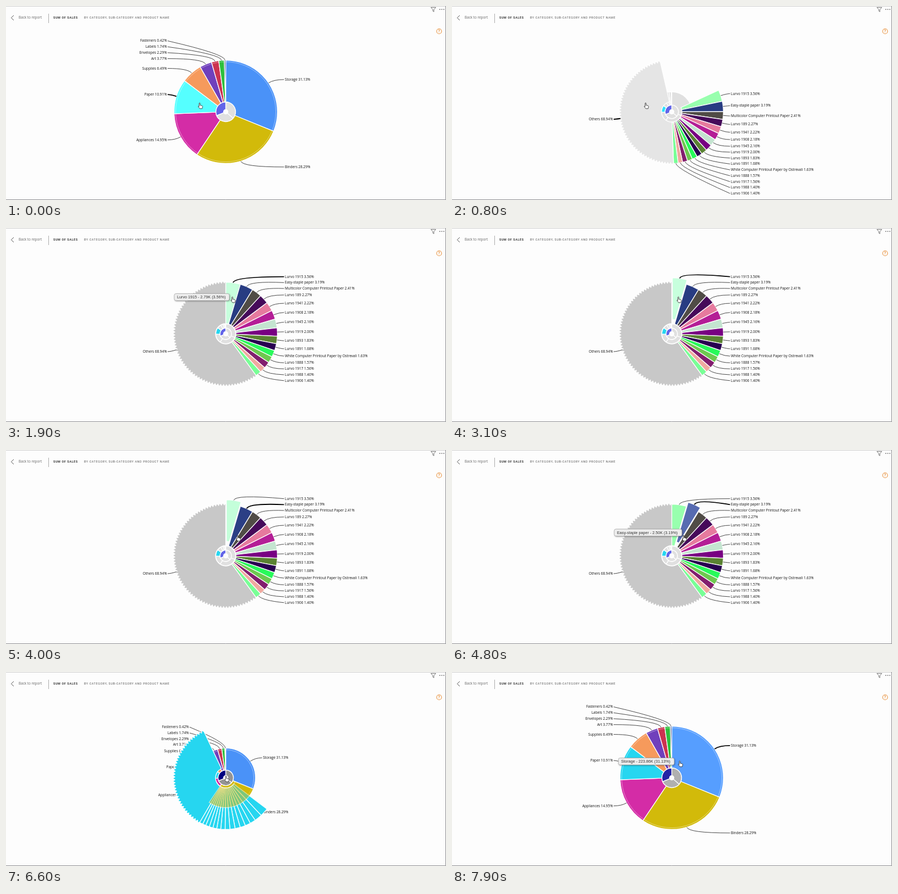
An HTML page with a canvas for the animation above (8000 ms loop, 800x353 px).

```html
<!DOCTYPE html>
<html lang="en">
<head>
<meta charset="utf-8">
<title>Drill-down pie</title>
<style>
html, body { margin: 0; width: 100%; height: 100%; overflow: hidden; background: #fdfdfd; }
canvas { display: block; }
</style>
</head>
<body>
<canvas width="800" height="353"></canvas>
<script>
const g = document.querySelector('canvas').getContext('2d');
const CX = 399.5, CY = 192.5, OUTER = 94, LOOP = 8000;
const DOWN = 195, UP = 6220, ZOOM = 800, FADE = 800;
const SANS = '"Open Sans", "Noto Sans", sans-serif';
const GRAY = [224, 224, 224], CYAN = [38, 214, 240];

// name, percent, colour
const groups = [
  ['Storage', 31.13, [74, 146, 248]], ['Binders', 28.29, [210, 186, 10]],
  ['Appliances', 14.95, [212, 44, 166]], ['Paper', 10.91, CYAN],
  ['Supplies', 6.49, [246, 154, 92]], ['Art', 3.77, [112, 64, 188]],
  ['Envelopes', 2.29, [204, 51, 80]], ['Labels', 1.74, [45, 191, 60]],
  ['Fasteners', .42, [40, 60, 130]]
];
const products = [
  ['Lurvo 1915', 3.56, [152, 255, 174]], ['Easy-staple paper', 3.19, [40, 60, 130]],
  ['Multicolor Computer Printout Paper', 2.41, [80, 76, 70]], ['Lurvo 189', 2.27, [70, 10, 90]],
  ['Lurvo 1941', 2.22, [230, 122, 158]], ['Lurvo 1908', 2.18, [180, 30, 150]],
  ['Lurvo 1945', 2.16, [196, 228, 208]], ['Lurvo 1919', 2, [120, 0, 130]],
  ['Lurvo 1893', 1.83, [90, 130, 50]], ['Lurvo 1891', 1.68, [40, 0, 80]],
  ['White Computer Printout Paper by Ostrevali', 1.63, [40, 250, 90]],
  ['Lurvo 1888', 1.57, [110, 200, 80]], ['Lurvo 1917', 1.56, [130, 30, 110]],
  ['Lurvo 1988', 1.4, [240, 170, 160]], ['Lurvo 1906', 1.4, [120, 255, 150]]
];
const others = ['Others', 68.94, [200, 200, 200]];
const shown = products.reduce((sum, p) => sum + p[1], 0);

// [from, to] in ms
const hovers = {
  Paper: [-FADE, DOWN], Others: [300, 1050], 'Lurvo 1915': [1050, 3950],
  'Easy-staple paper': [3950, 5700], center: [5750, 7610], Storage: [7700, 9000]
};
const pulls = { 'Lurvo 1915': [2200, 4450], 'Easy-staple paper': [4400, 5750] };
const tips = [
  [1600, 2200, 306, 119.5, 100, 'Lurvo 1915 - 2.79K (3.56%)'],
  [4300, 5700, 295, 144, 123, 'Easy-staple paper - 2.50K (3.19%)'],
  [7700, 8000, 302.5, 156.5, 101.5, 'Storage - 223.86K (31.13%)']
];
const pointer = [
  [0, 352, 176], [950, 352, 176], [1100, 411.5, 125], [3700, 411.5, 125], [4000, 421, 155],
  [5500, 421, 155], [5800, 400, 189], [7600, 400, 189], [7800, 414, 161.5], [LOOP, 414, 161.5]
];
const hand = new Path2D('M-1 1Q0-1 1 1V5L5 6Q6.3 6.5 6 8.5L5 12H.5L-3 7.7Q-2.5 6-1 7.8Z');

let t = 0;
const clamp = v => Math.max(0, Math.min(1, v));
const ease = v => v * v * (3 - 2 * v);
const ramp = (from, ms) => clamp((t - from) / ms);
const mix = (a, b, k) => a.map((v, i) => v + (b[i] - v) * k);
const rgb = c => `rgb(${c.map(v => Math.min(255, Math.round(v)))})`;
const fadeOf = ([a, b]) => ramp(a, FADE) - ramp(b, FADE);
const within = s => !!s && t >= s[0] && t < s[1];
const lit = (name, c) => hovers[name] ? c.map(v => v + 47 * fadeOf(hovers[name])) : c;
const pullOf = name => {
  const s = pulls[name];
  return s ? 8 * (ease(ramp(s[0], 300)) - ease(ramp(s[1], 300))) : 0;
};
const polar = (deg, r) => {
  const a = deg * Math.PI / 180;
  return [CX + r * Math.sin(a), CY - r * Math.cos(a)];
};

function slice(a0, a1, r0, r1, color, pull = 0, jagged = false) {
  const rad = a => (a - 90) * Math.PI / 180;
  const [x, y] = polar((a0 + a1) / 2, pull);
  g.beginPath();
  g.arc(x, y, r0, rad(a1), rad(a0), true);
  if (jagged) {
    const n = Math.max(2, Math.round((a1 - a0) / 1.6));
    for (let i = 0; i <= n; i++) {
      g.lineTo(...polar(a0 + (a1 - a0) * i / n, r1 + (i % 2 ? 2.6 : -1.4)));
    }
  } else {
    g.arc(x, y, r1, rad(a0), rad(a1));
  }
  g.closePath();
  g.fillStyle = rgb(color);
  g.fill();
  g.strokeStyle = '#fff';
  g.lineWidth = 1.3;
  g.stroke();
}

function text(s, x, y, font, color, align = 'left', spacing = 0) {
  g.font = font;
  g.fillStyle = color;
  g.textAlign = align;
  g.letterSpacing = spacing + 'px';
  g.fillText(s, x, y);
}

function line(points, color, width = 1) {
  g.beginPath();
  points.forEach(p => g.lineTo(...p));
  g.strokeStyle = color;
  g.lineWidth = width;
  g.stroke();
}

// Clockwise layout: each label keeps clear of the one before it.
function labels(parts, r) {
  let low = -1e4, high = 1e4;
  for (const { name, pct, a0, a1 } of parts) {
    const mid = (a0 + a1) / 2, side = mid < 180 ? 1 : -1, pull = pullOf(name);
    let y = polar(mid, r + 11)[1];
    if (side > 0) low = y = Math.max(y, low + 10.75);
    else high = y = Math.min(y, high - 10.75);
    const end = CX + side * (r + 106 - OUTER + (side > 0 ? 0 : -.5));
    g.beginPath();
    g.moveTo(...polar(mid, r + pull));
    g.quadraticCurveTo(...polar(mid, r + 11 + pull), end, y);
    const hot = within(hovers[name]);
    g.strokeStyle = hot ? '#000' : '#333';
    g.lineWidth = hot ? 1.9 : .9;
    g.stroke();
    text(`${name} ${pct.toFixed(2)}%`, end + side * 1.6, y + .3, '6.4px ' + SANS, '#111', side > 0 ? 'left' : 'right');
  }
}

function spread(list, from, scale) {
  return list.map(([name, pct, color]) => ({ name, pct, color, a0: from, a1: from += pct * scale }));
}

function header() {
  g.fillStyle = '#fdfdfd';
  g.fillRect(0, 0, 800, 353);
  line([[0, .5], [800, .5]], '#d0d0d0');
  line([[799.5, 0], [799.5, 352.5], [0, 352.5]], '#8c8c90');
  line([[14, 17], [9.5, 21.5], [14, 26]], '#555');
  text('Back to report', 23, 21.8, '6.4px ' + SANS, '#666');
  line([[77.5, 14], [77.5, 31]], '#aaa');
  text('SUM OF SALES', 86, 21.8, 'bold 5.4px Roboto, sans-serif', '#333', 'left', .62);
  text('BY CATEGORY, SUB-CATEGORY AND PRODUCT NAME', 142, 21.8, '5.4px Roboto, sans-serif', '#555', 'left', .63);
  line([[772.5, 2.5], [781.5, 2.5], [778, 6.5], [778, 10.5], [776, 9], [776, 6.5], [772.5, 2.5]], '#666', .9);
  g.fillStyle = '#555';
  for (const x of [788, 791.7, 795.4]) g.fillRect(x, 5.5, 1.5, 1.5);
  g.beginPath();
  g.arc(787.5, 46, 4.5, 0, 7);
  g.strokeStyle = '#e8903c';
  g.lineWidth = 1.1;
  g.stroke();
  text('?', 787.5, 46.4, 'bold 7px ' + SANS, '#e8903c', 'center');
}

function chart() {
  const down = ramp(DOWN, ZOOM), up = ramp(UP, ZOOM), p = down - up;
  const r = 18 - 7.5 * p, R = OUTER - 76 * p, rising = t >= UP;

  const dark = fadeOf(hovers.center);
  const rest = mix(GRAY, [148, 148, 148], dark);
  const blue = mix([98, 100, 232], [0, 0, 128], dark);
  slice(0, 131, 4, r, rest);
  slice(131, 247.3, 4, r, rest);
  slice(247.3, 360, 4, r, blue);

  const ring = spread(groups, 0, 360 / 99.99);
  const paper = ring[3], binders = ring[1];
  for (const s of ring) {
    const faded = rising || s === paper ? 0 : clamp(down * 2);
    slice(s.a0, s.a1, r, R, mix(lit(s.name, s.color), GRAY, faded));
  }
  if (rising || !down) {
    g.beginPath();
    g.arc(CX, CY, R - 3, 0, 7);
    g.strokeStyle = 'rgba(255,255,255,.55)';
    g.lineWidth = .8;
    g.stroke();
    labels(ring, R);
  }

  if (p > 0) {
    const from = paper.a0 * (1 - p), to = paper.a1 + (360 - paper.a1) * p;
    const span = to - from;
    const parts = spread(products, from, span * .4 / shown);
    parts.push({ name: others[0], pct: others[1], color: others[2], a0: from + span * .4, a1: to });
    for (const s of parts) {
      const color = rising ? CYAN : lit(s.name, s.color);
      slice(s.a0, s.a1, 18.5, OUTER, color, pullOf(s.name), s.name === 'Others');
    }
    if (!rising) {
      labels(parts, OUTER);
    } else if (up > 0) {
      g.globalAlpha = .5;
      slice(binders.a0, binders.a1, 18.5, R, binders.color);
      g.globalAlpha = 1;
    }
  }
}

function tooltip(x, y, w, s) {
  g.save();
  g.shadowColor = 'rgba(0,0,0,.45)';
  g.shadowBlur = 3;
  g.shadowOffsetX = g.shadowOffsetY = 1;
  g.beginPath();
  g.roundRect(x, y, w, 12.5, 3);
  g.fillStyle = '#eee';
  g.fill();
  g.restore();
  g.strokeStyle = '#aaa';
  g.lineWidth = .8;
  g.stroke();
  text(s, x + 5, y + 6.7, '7.2px "Liberation Sans", Arial, sans-serif', '#333');
}

function cursor() {
  const i = pointer.findIndex(k => k[0] > t);
  const a = pointer[i - 1], b = pointer[i];
  const k = ease((t - a[0]) / (b[0] - a[0]));
  g.save();
  g.translate(a[1] + (b[1] - a[1]) * k, a[2] + (b[2] - a[2]) * k);
  g.scale(.9, .9);
  g.fillStyle = '#fff';
  g.fill(hand);
  g.strokeStyle = '#222';
  g.lineWidth = .9;
  g.stroke(hand);
  g.restore();
}

function frame(now) {
  t = Math.floor(now % LOOP / 100) * 100;
  g.textBaseline = 'middle';
  header();
  chart();
  for (const [from, to, ...tip] of tips) if (t >= from && t < to) tooltip(...tip);
  cursor();
  requestAnimationFrame(frame);
}
requestAnimationFrame(frame);
</script>
</body>
</html>
```
